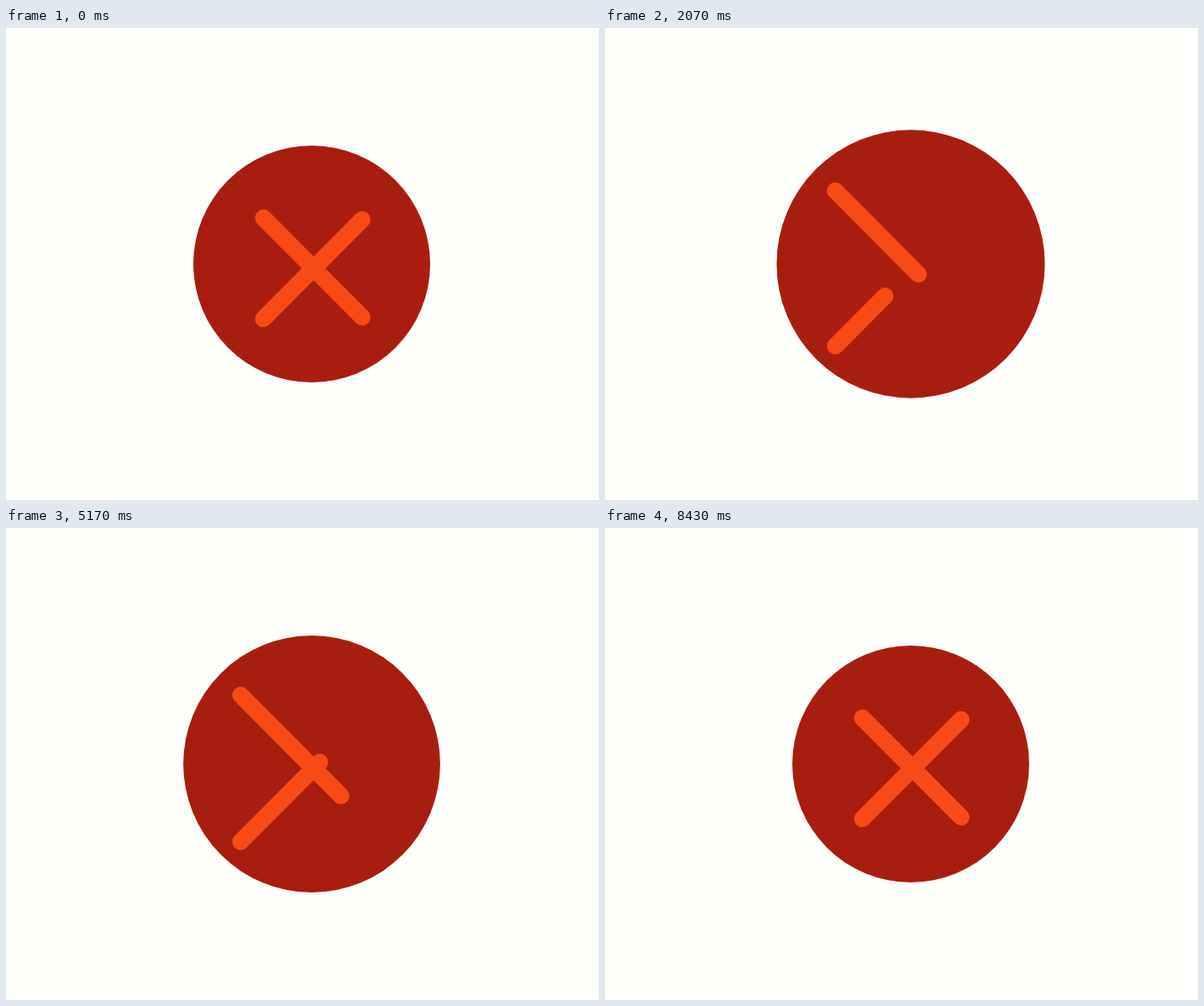
Write an HTML page with a canvas that moves like this. It is 706x562 px and loops after 8.46 s.

```html
<!DOCTYPE html>
<html lang="en">
<head>
<meta charset="utf-8">
<title>Error icon</title>
<style>
  html, body { margin: 0; width: 100%; height: 100%; overflow: hidden; background: #fffffc; }
  canvas { display: block; }
</style>
</head>
<body>
<canvas id="stage" width="706" height="562"></canvas>
<script>
const ctx = document.getElementById('stage').getContext('2d');

const LOOP = 8460, CYCLE = 2967, CUT = 117;
const CX = 364, CY = 281, R = 141, PEAK = 162;
const ARC_END = 313.3;
const CROSS = { x: 365.2, slope: 1.005, from: -91, half: 58.8 };
const PAPER = [255, 255, 252], RED = [168, 30, 14], ORANGE = [247, 74, 22];

const span = (t, a, b) => Math.min(1, Math.max(0, (t - a) / (b - a)));
const ease = (t, a, b) => { const x = span(t, a, b); return x * x * (3 - 2 * x); };
const mix = (a, b, k) => a + (b - a) * k;
const rgb = c => `rgb(${c.map(Math.round).join(',')})`;

function disc(t) {
  const grow = ease(t, 1450, 1960);
  if (!grow) return;
  const radius = PEAK * grow - (PEAK - R) * ease(t, 1960, 2496);
  const k = span(t, 1450, 1850);
  // blue drops first, so the tint runs pale yellow, orange, red
  const fade = [k ** 1.3, k ** 1.7, 1 - (1 - k) ** 2];
  ctx.fillStyle = rgb(PAPER.map((c, i) => mix(c, RED[i], fade[i])));
  ctx.beginPath();
  ctx.arc(CX, CY, radius, 0, Math.PI * 2);
  ctx.fill();
}

function ring(t) {
  const head = ARC_END * ease(t, 146, 1507);
  const tail = Math.min(ARC_END, (0.0271 * Math.max(0, t - 842)) ** 1.8);
  if (head - tail < 0.01) return;
  const rad = deg => (deg - 90) * Math.PI / 180;
  ctx.strokeStyle = rgb(RED);
  ctx.lineWidth = 15;
  ctx.beginPath();
  ctx.arc(CX, CY, R, rad(tail), rad(head));
  ctx.stroke();
}

function bar(t, y, dir, begin, end) {
  if (t <= begin) return;
  const { x, slope, from, half } = CROSS;
  const a = mix(from, -half, ease(t, 2110, 2480));
  const b = Math.max(a + 0.01, mix(from, half, ease(t, begin, end)));
  const k = span(t, 1530, 1850);
  ctx.strokeStyle = rgb(RED.map((c, i) => mix(c, ORANGE[i], k)));
  ctx.lineWidth = 20;
  ctx.beginPath();
  ctx.moveTo(x + a, y + dir * slope * a);
  ctx.lineTo(x + b, y + dir * slope * b);
  ctx.stroke();
}

function draw(ms) {
  const phase = (ms % LOOP) % CYCLE;
  const t = phase < CUT ? CYCLE : phase;
  ctx.fillStyle = rgb(PAPER);
  ctx.fillRect(0, 0, 706, 562);
  ctx.lineCap = 'round';
  disc(t);
  ring(t);
  bar(t, 285.2, 1, 1450, 2470);
  bar(t, 287.2, -1, 1755, 2490);
}

const start = performance.now();
function tick() {
  draw(performance.now() - start);
  requestAnimationFrame(tick);
}
tick();
</script>
</body>
</html>
```
